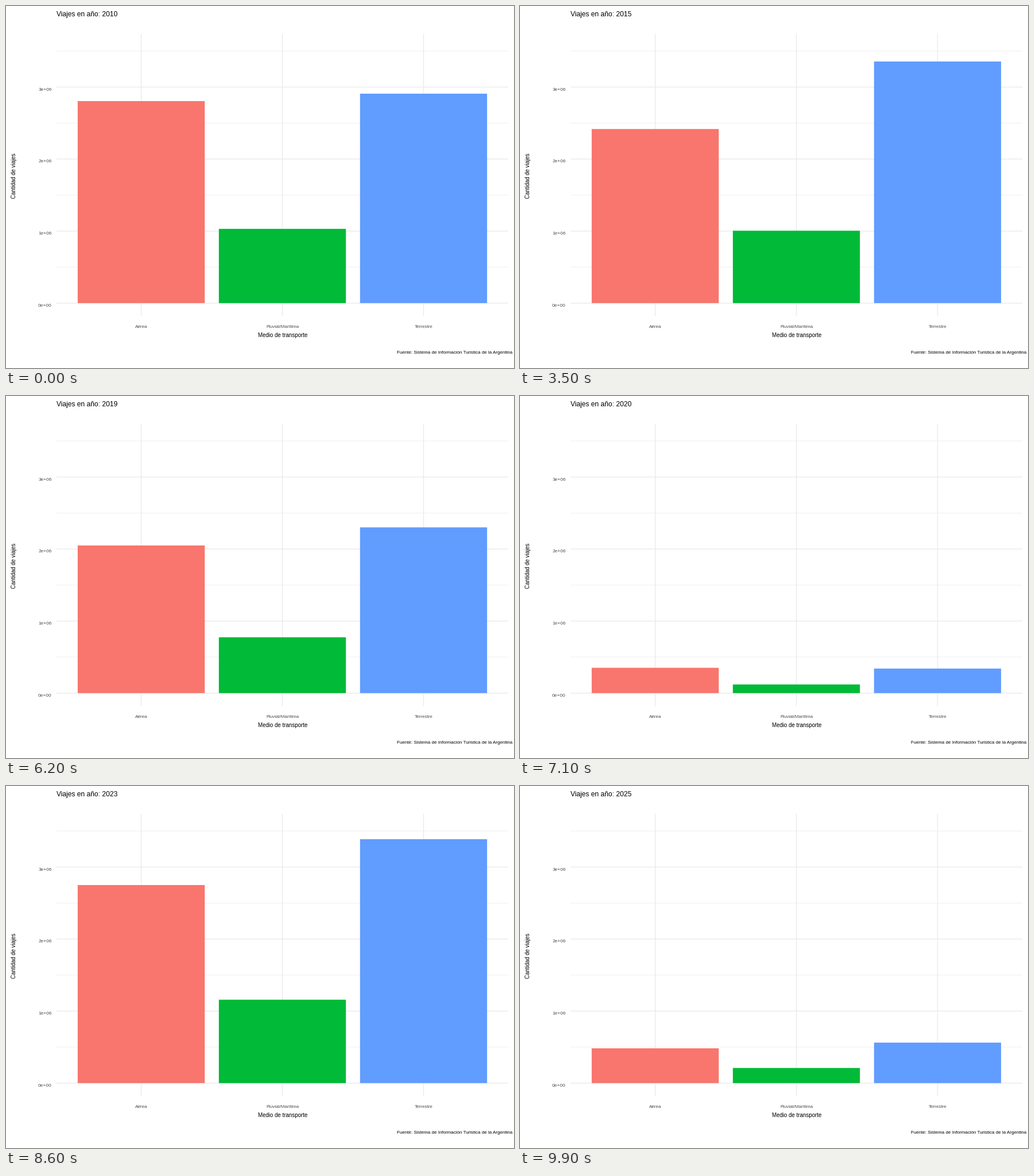
Write a matplotlib script that moves like this. It is 885 px wide and 632 px high and loops after 10 s.

```python
import numpy as np
import matplotlib.pyplot as plt
from matplotlib.animation import FuncAnimation
from matplotlib.patches import Rectangle

W, H, DPI = 885, 632, 100
FRAMES, INTERVAL = 100, 100
PX = 72 / DPI  # points per pixel

plt.rcParams["font.family"] = "Liberation Sans"

# Panel geometry in pixels, y pointing down
LEFT, RIGHT, TOP, BOTTOM = 88, 875, 48.7, 541.1
ZERO, PER_MILLION = 518.7, 125.73
STEP = (RIGHT - LEFT) / 3.2
CENTRES = LEFT + STEP * (0.6 + np.arange(3))
BAR_W = 0.9 * STEP

MODES = ["Aérea", "Fluvial/Marítima", "Terrestre"]
COLORS = ["#F8766D", "#00BA38", "#619CFF"]
GRID = "#EBEBEB"
TICK = "#4D4D4D"

# Trips in millions, one value per year
YEARS = np.arange(2010, 2026)
TRIPS = np.array([
    [2.805, 2.82, 2.68, 2.57, 2.57, 2.42, 2.41, 2.56,
     2.76, 3.04, 0.73, 0.20, 1.66, 2.75, 2.75, 0.483],
    [1.031, 1.01, 0.98, 1.041, 1.04, 1.002, 1.012, 1.02,
     1.05, 1.086, 0.36, 0.024, 0.54, 1.158, 0.96, 0.21],
    [2.908, 2.87, 2.837, 2.874, 3.56, 3.394, 3.257, 3.13,
     3.13, 3.27, 1.01, 0.073, 1.69, 3.387, 2.88, 0.562],
])
SPAN = len(YEARS) - 1
KEYS = np.round(np.arange(len(YEARS)) * (FRAMES - 1) / SPAN)

fig = plt.figure(figsize=(W / DPI, H / DPI), dpi=DPI, facecolor="white")
ax = fig.add_axes([0, 0, 1, 1])
ax.set_xlim(0, W)
ax.set_ylim(H, 0)
ax.axis("off")


def y_of(millions):
    return ZERO - PER_MILLION * millions


def line(xs, ys, width):
    ax.plot(xs, ys, color=GRID, lw=width * PX, solid_capstyle="butt",
            snap=False, zorder=1)


def label(x, y, text, size, color="black", ha="center", **kw):
    return ax.text(x, y, text, fontsize=size * PX, color=color, ha=ha,
                   va="baseline", **kw)


for half in range(8):
    y = y_of(half / 2)
    line([LEFT, RIGHT], [y, y], 0.71 if half % 2 else 1.42)
for x in CENTRES:
    line([x, x], [TOP, BOTTOM], 1.42)

for n in range(4):
    label(79.8, y_of(n) + 6, f"{n}e+0{6 if n else 0}", 8.3, TICK, "right")
for x, mode in zip(CENTRES, MODES):
    label(x, 562, mode, 8.15, TICK)

label(481.8, 577.6, "Medio de transporte", 9.75)
label(16.8, 296, "Cantidad de viajes", 9.7, rotation=90,
      rotation_mode="anchor")
label(882.5, 607, "Fuente: Sistema de Información Turistica de la Argentina",
      8.04, ha="right")
title = label(88, 18, "", 12, ha="left")

bars = [ax.add_patch(Rectangle((x - BAR_W / 2, ZERO), BAR_W, 0, facecolor=c,
                               lw=0, snap=False, zorder=2))
        for x, c in zip(CENTRES, COLORS)]


def update(i):
    year = YEARS[0] + i * SPAN // (FRAMES - 1)
    title.set_text(f"Viajes en año: {year}")
    for bar, series in zip(bars, TRIPS):
        bar.set_height(-PER_MILLION * np.interp(i, KEYS, series))
    return [title, *bars]


anim = FuncAnimation(fig, update, frames=FRAMES, interval=INTERVAL,
                     init_func=lambda: update(0), repeat=True,
                     repeat_delay=0, blit=False)
plt.show()
```
